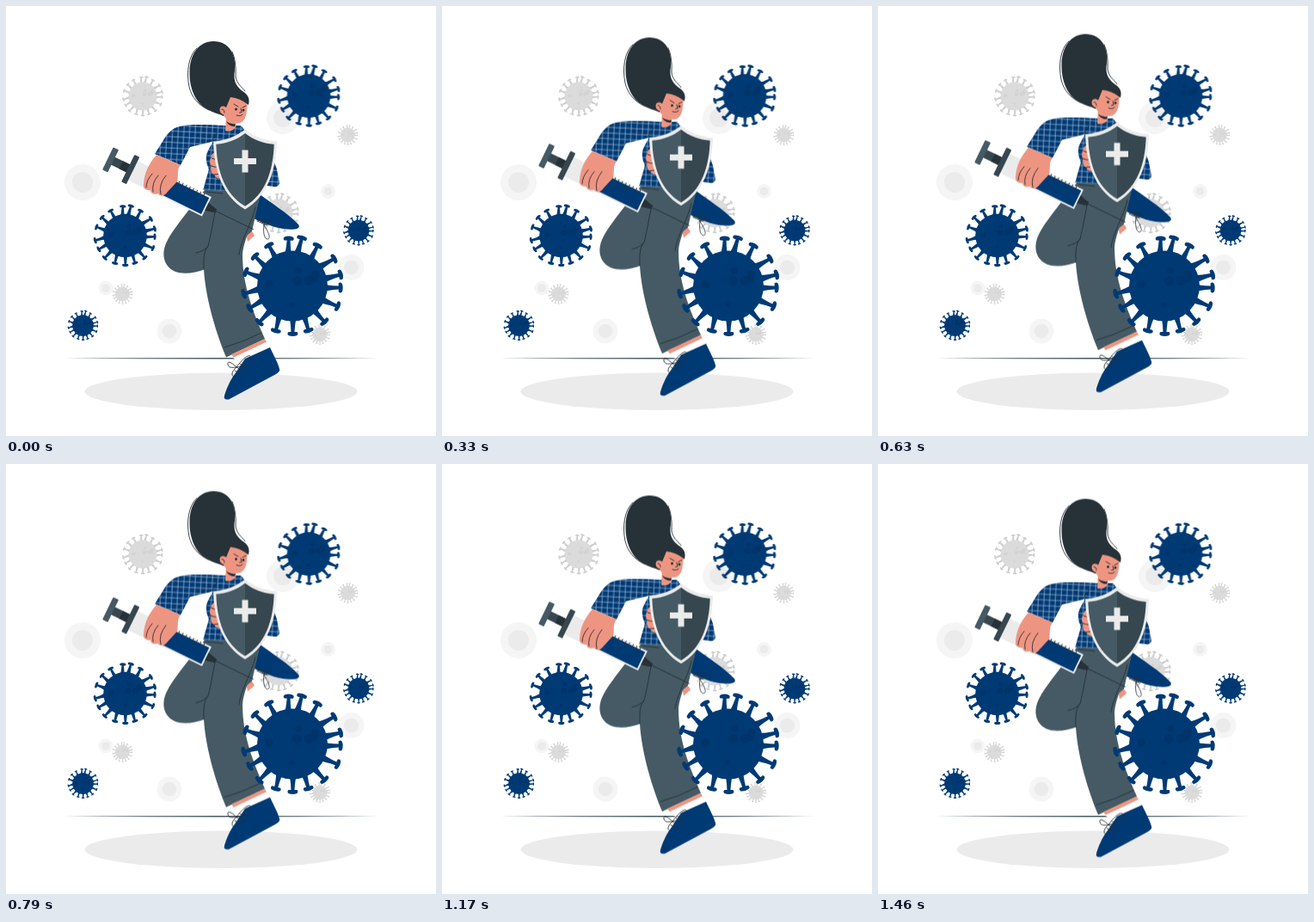
An HTML page for the animation above (1500 ms loop, 500 px wide and 500 px high).

```html
<!DOCTYPE html>
<html lang="en">
<head>
<meta charset="utf-8">
<title>Shield and syringe</title>
<style>
  html, body { margin: 0; width: 100%; height: 100%; overflow: hidden; background: #fff; }
  svg { display: block; width: 100vw; height: 100vh; }
  #hero { animation: float 1.5s linear infinite; }
  @keyframes float { 50% { transform: translateY(-10px); } }
  .ink { fill: none; stroke: #263238; stroke-width: .9; stroke-linecap: round; stroke-linejoin: round; }
  .skin { fill: #ee9582; }
  .blue { fill: #003a75; }
  .dark { fill: #263238; }
  .slate { fill: #37474f; }
  .pants { fill: #455a64; }
  .pale { fill: #ebebeb; }
  .white { fill: #fff; }
</style>
</head>
<body>
<svg viewBox="0 0 500 500">
  <defs>
    <pattern id="plaid" width="6.6" height="6.6" patternUnits="userSpaceOnUse" patternTransform="rotate(3)">
      <rect width="7" height="7" fill="#003a75"/>
      <path d="M0 3H7M3 0V7" stroke="#b4c6dc" stroke-width=".65"/>
    </pattern>
    <!-- right half, origin at the top centre -->
    <path id="half" d="M0 0C10 8 23 13 37 14C36 48 26 78 0 93Z"/>
    <path id="bow" class="ink" d="M0 0C-6-6-11-8-10-3S-2 0 0 0C5-7 14-17 17-12S7-1 0 0C-5 4-7 10-3 11"/>
  </defs>

  <g id="discs"></g>
  <path d="M68 409.700Q250 408.300 433 409.700Q250 411.100 68 409.700Z" class="pants"/>
  <ellipse class="pale" cx="250" cy="448.300" rx="158.500" ry="21.700"/>
  <g id="back"></g>

  <g id="hero">
    <!-- rear foot -->
    <path class="skin" d="M279 263L286 261L289 267L281 274Z"/>
    <path class="white" d="M284 261L289 248L298 255L289 265Z"/>
    <path class="blue" d="M295 219C308 229 328 241 340 254C342 257 340 259 336 259.500C324 261 308 257 288 247Z"/>
    <path class="ink" d="M294 247L308 252M292 250L304 255"/>
    <use href="#bow" transform="translate(300 255) rotate(110) scale(.8)"/>

    <!-- trousers -->
    <path class="pants" d="M231 214C221 227 198 254 188 272C182 283 182 293 187 301C195 313 213 313 232 306L286 262L296 217Z"/>
    <path class="pants" d="M232 213H296C295 240 277 266 275 289C275 326 288 357 301 387L256 408.500C245 382 232 341 230 306C229 284 237 262 239 236Z"/>
    <path class="ink" d="M244 236C241 248 239 264 235 279Q231 285 221 287M235 279C229 286 230 296 230 306M290 234C286 252 273 272 271 289M254 397Q275 391 297 380M233 216L252 218"/>

    <!-- front foot -->
    <path class="skin" d="M262 405L301 387L303 391L265 409Z"/>
    <path class="white" d="M264 409L302 391L307 398L272 415Z"/>
    <path class="blue" d="M278 410L307 397C311 406 316 414 318 422C319 424 317 426 314 428L259 457.500C255 458 253 457 254 453C256 446 260 436 266 428Z"/>
    <path class="ink" d="M266 424L274 429M268 420L277 425M272 416L280 421"/>
    <use href="#bow" x="268" y="420"/>

    <!-- shirt -->
    <path d="M246 141L256 139H273L290 158Q309 170 315 190L318 206Q317 211 311 210L296 208V216L229 214L236 190Q230 177 235 168L242 155Z" fill="url(#plaid)"/>
    <path d="M256 139C235 138 213 137 202 140C193 142 187 149 183 156L173 172L203 185L214 164L247 156Z" fill="url(#plaid)"/>
    <path class="ink" d="M239 157Q241 151 246 147M236 190Q241 182 240 171"/>
    <path class="skin" d="M256 126H267V141Q262 147 255 145Z"/>

    <!-- head -->
    <path class="skin" d="M256 104L281 111C280 122 280 131 274 135C267 139 257 134 253 127Z"/>
    <path class="dark" d="M256 134Q261 138 267 137L266 140Q259 140 256 134Z"/>
    <path class="dark" d="M241 41C225 41 214 55 213.500 76C213 97 221 113 234 120C240 124 247 125 253 128L256 118L261 106Q272 107 282 115C284 107 281 103 275 99C267 93 264 86 266 75C268 57 260 41 241 41Z"/>
    <path class="ink" d="M222 49C212 58 209.500 77 213 94C216 106 223 115 236 121M263 53Q268 64 267 82C268 90 274 94 278 99"/>
    <path class="skin" d="M256 118C252 115 248 117 248.500 121S252 127 256 126Z"/>
    <path class="ink" d="M251 120Q254 120 254 124M265 114L270 117M275 118L279 116M273 119L274 123.500L271.500 124M268 127Q273 129 275 126"/>
    <circle class="dark" cx="267.500" cy="120" r="1.500"/>
    <circle class="dark" cx="276" cy="121" r="1.500"/>

    <!-- syringe -->
    <g transform="translate(122 179) rotate(26)">
      <rect class="slate" y="-5" width="24" height="10"/>
      <rect class="dark" x="13" y="-5" width="12" height="10"/>
      <rect class="pants" x="-4" y="-14.500" width="7" height="29" rx="1"/>
      <rect class="pale" x="27" y="-12.500" width="97" height="25"/>
      <rect class="blue" x="66" y="-10.500" width="56" height="21"/>
      <rect class="slate" x="22" y="-17.500" width="6.500" height="35" rx="1"/>
      <path class="dark" d="M124-5L136-2V2L124 5Z"/>
      <path id="ticks" class="ink" d="M136 0H184"/>
    </g>
    <path class="skin" d="M175 173L203 185C198 191 201 196 199 204L188 216C184 222 178 221 177 218C172 220 168 218 168 214C163 215 159 212 160 207C161 194 165 185 175 173Z"/>
    <path class="ink" d="M170 195Q163 203 163 211M177 197Q169 206 171 216M186 197Q177 208 180 219"/>

    <!-- shield -->
    <path class="skin" d="M250 170C243 168 238 172 239 176C236 179 237 184 239 186C237 190 239 195 242 196Q245 202 252 200Z"/>
    <path class="ink" d="M239 177Q242 179 246 178M239 186Q242 188 247 187M242 196Q245 196 248 195"/>
    <g transform="translate(278 143.500)">
      <use href="#half" class="pale"/>
      <use href="#half" class="pale" transform="scale(-1 1)"/>
      <g transform="translate(0 4.500) scale(.91)">
        <use href="#half" class="slate"/>
        <use href="#half" class="pants" transform="scale(-1 1)"/>
      </g>
      <path d="M0 24V50M-13 37H13" stroke="#ebebeb" stroke-width="7"/>
    </g>
  </g>

  <g id="front"></g>
</svg>
<script>
  const byId = id => document.getElementById(id);
  const repeat = (n, draw) => Array.from({ length: n }, (_, i) => draw(i)).join('');

  let seed = 11;
  const rand = () => (seed = seed * 16807 % 2147483647) / 2147483647;
  const jitter = amount => (rand() - .5) * amount;

  const ticks = byId('ticks');
  ticks.setAttribute('d', ticks.getAttribute('d') + repeat(11, i => `M${69 + i * 4.6}-12.500v${i % 2 ? 4 : 6}`));

  const disc = (x, y, r) =>
    `<g transform="translate(${x} ${y}) scale(${r})"><circle r="1" fill="#f5f5f5"/><circle r=".57" class="pale"/></g>`;
  byId('discs').innerHTML = disc(89, 205, 21) + disc(322, 130, 19) + disc(374.5, 215.5, 8.5)
    + disc(401.5, 304, 15) + disc(116, 328, 8.5) + disc(190, 378, 14.5);

  // One virus shape of radius 60, reused at every size
  const COUNT = 17;
  const spike = i => {
    const angle = i * 360 / COUNT + 6 + jitter(5);
    return `<g transform="rotate(${angle}) translate(${38 + jitter(4)} 0) rotate(${jitter(24)})">
      <path d="M-4-5Q4-2.500 16-2V-5Q18-7 20-5Q22 0 20 5Q18 7 16 5V2Q4 2.500-4 5Z"/></g>`;
  };
  const spot = () => {
    const a = rand() * 2 * Math.PI, d = 8 + rand() * 22;
    return `<circle cx="${d * Math.cos(a)}" cy="${d * Math.sin(a)}" r="${3 + rand() * 4}"/>`;
  };
  const spikes = repeat(COUNT, spike), spots = repeat(7, spot);

  const virus = (edge, body, shade) => (x, y, r) =>
    `<g transform="translate(${x} ${y}) scale(${r / 60})">
      <g fill="${edge}">${spikes}</g><circle r="41" fill="${body}"/><g fill="${shade}">${spots}</g></g>`;
  const grey = virus('#cfcfcf', '#dbdbdb', '#d3d3d3');
  const blue = virus('#003a75', '#003a75', '#00346a');

  byId('back').innerHTML = grey(159, 105, 24) + grey(397.5, 150, 12) + grey(317, 241, 24)
    + grey(135.5, 335, 12) + grey(365, 382, 12);
  byId('front').innerHTML = blue(352, 104.5, 37) + blue(138.5, 267, 37) + blue(410, 261, 18)
    + blue(89.5, 371.5, 18) + blue(333, 325.5, 60);
</script>
</body>
</html>
```
